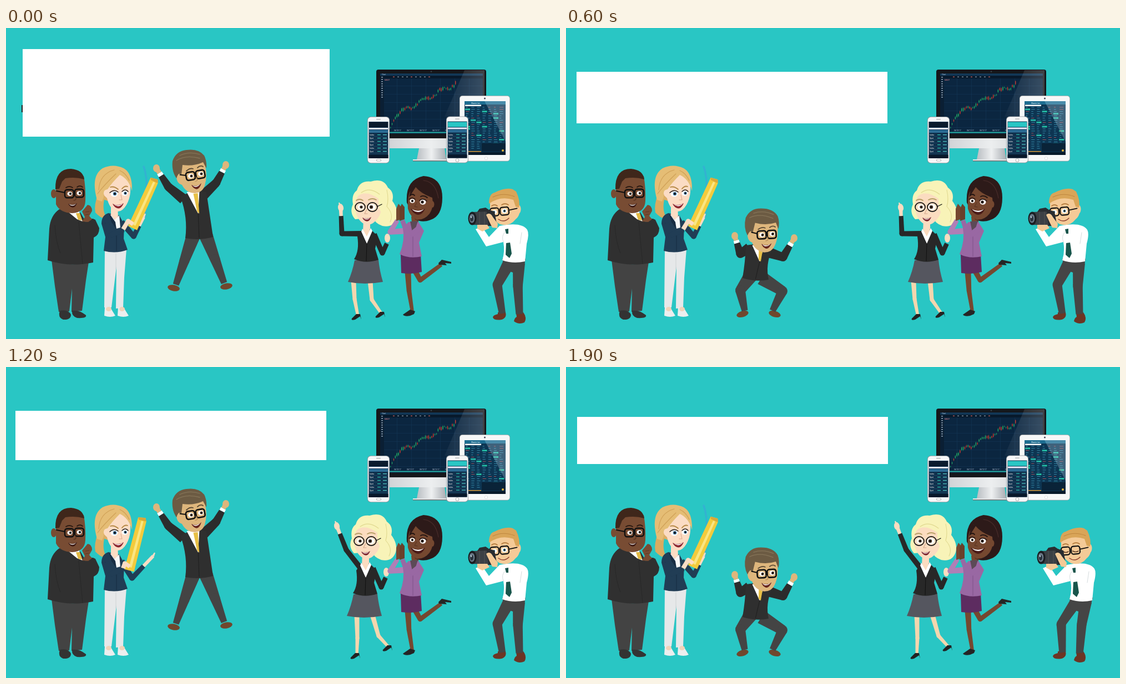
Write an HTML page that moves like this. It is 998 px wide and 561 px high and loops after 2 s.

```html
<!DOCTYPE html>
<html lang="en">
<head>
<meta charset="utf-8">
<title>Office party</title>
<style>
html, body { margin: 0; width: 100%; height: 100%; overflow: hidden; background: #29c6c4; }
svg { display: block; width: 100vw; height: 100vh; }
text { font-family: Roboto, Arial, sans-serif; }
</style>
</head>
<body>
<svg id="stage" viewBox="0 0 998 561"></svg>
<script>
const BG = '#29c6c4';

// basic shapes
const path = (fill, d, more = '') => `<path fill="${fill}" d="${d}" ${more}/>`;
const line = (color, w, d) => path('none', d, `stroke="${color}" stroke-width="${w}" stroke-linecap="round" stroke-linejoin="round"`);
const oval = (fill, x, y, rx, ry = rx, a = 0) =>
  `<ellipse fill="${fill}" cx="${x}" cy="${y}" rx="${rx}" ry="${ry}" transform="rotate(${a} ${x} ${y})"/>`;
const box = (fill, x, y, w, h, r = 0) => `<rect fill="${fill}" x="${x}" y="${y}" width="${w}" height="${h}" rx="${r}"/>`;
const label = (fill, x, y, size, s) => `<text fill="${fill}" x="${x}" y="${y}" font-size="${size}">${s}</text>`;
const group = (transform, body) => `<g transform="${transform}">${body}</g>`;
const repeat = (n, f) => Array.from({ length: n }, (_, i) => f(i)).join('');
const mix = (a, b, t) => a + (b - a) * t;
const between = (p, q, t) => [mix(p[0], q[0], t), mix(p[1], q[1], t)];

// face parts
const eye = (x, y, r, iris, dx = 0) => oval('#fff', x, y, r, r * .85) + oval(iris, x + dx, y, r * .5) + oval('#111', x + dx, y, r * .3);
const brow = (color, x, y, w, tilt = 0) => line(color, 1.8, `M${x - w},${y - tilt}Q${x},${y - 4} ${x + w},${y + tilt}`);
const smile = (color, x, y, w, tilt = 0) =>
  path(color, `M${x - w},${y}Q${x},${y + w * .5} ${x + w},${y - tilt}Q${x + w * .6},${y + w * .9} ${x},${y + w * .85}Q${x - w * .7},${y + w * .7} ${x - w},${y}Z`)
  + path('#fff', `M${x - w * .85},${y + .8}Q${x},${y + w * .5} ${x + w * .85},${y - tilt + 1}Q${x},${y + w * .85} ${x - w * .85},${y + .8}Z`);
function glasses(x1, y1, x2, y2, r, w, round, ear) {
  const rim = (x, y) => `<rect x="${x - r}" y="${y - r * .9}" width="${r * 2}" height="${r * 1.8}" rx="${round}" fill="none" stroke="#111" stroke-width="${w}"/>`;
  return rim(x1, y1) + rim(x2, y2) + line('#111', w * .8, ear);
}

// tapered limb through points
function limb(fill, w0, w1, ...pts) {
  const n = pts.length - 1;
  return repeat(n, i => {
    const [x, y] = pts[i], [u, v] = pts[i + 1];
    const a = mix(w0, w1, i / n) / 2, b = mix(w0, w1, (i + 1) / n) / 2;
    const d = Math.hypot(u - x, v - y) || 1, nx = (y - v) / d, ny = (u - x) / d;
    return path(fill, `M${x + nx * a},${y + ny * a}L${u + nx * b},${v + ny * b}L${u - nx * b},${v - ny * b}L${x - nx * a},${y - ny * a}Z`)
      + (i < n - 1 ? oval(fill, u, v, b) : '');
  });
}
// middle joint of a limb, pushed sideways or down
const joint = (p, q, dx, dy) => [(p[0] + q[0]) / 2 + dx, (p[1] + q[1]) / 2 + dy];

let seed = 7;
const rnd = () => (seed = seed * 16807 % 2147483647) / 2147483647;

function candles() {
  return repeat(42, i => {
    const t = i / 41, x = 692 + 117 * t, h = 1 + rnd() * 5;
    const y = 178 - 16 * Math.min(1, t * 16) - 62 * t + 4 * Math.sin(t * 22) + rnd() * 4 - 2;
    const c = rnd() < .65 ? '#25a866' : '#c23c30';
    return box(c, x + .5, y - h / 2 - 1.5, .5, h + 3) + box(c, x, y - h / 2, 1.5, h);
  });
}

function monitor() {
  return box('#15171b', 667, 75, 198, 128, 4) + box('url(#metal)', 667, 198, 198, 19, 3) + box('#15171b', 667, 195, 198, 4)
    + path('url(#stand)', 'M744,217H790L793,237H740Z') + box('#e4e6e8', 733, 237, 64, 2) + box('#777', 733, 239, 64, 1.5)
    + box('#0b2640', 674, 82, 185, 109) + box('#123756', 674, 82, 185, 4) + box('#081a2c', 674, 86, 185, 5) + box('#0a1f34', 674, 91, 7, 98)
    + oval('#3a4148', 766, 78.5, 1.3) + label('#bcd', 677, 85.3, 3, 'Chart') + label('#e88', 682, 94.5, 3.5, 'DAILY')
    + repeat(10, i => box('#9ab', 676, 88 + i * 4, 3, 1.4)) + repeat(9, i => box(i % 4 ? '#789' : '#a55', 697 + i * 8, 87.5, 3, 1.5))
    + repeat(6, i => box('#15395a', 704 + i * 26, 91, .5, 97) + box('#15395a', 681, 104 + i * 15, 178, .5))
    + candles() + repeat(5, i => label('#bcd', 699 + i * 23, 186, 3, '04/1' + i + '/17'))
    + box('#16616e', 674, 187, 185, 3) + line('#2fd3ba', .8, 'M676,188.5H794')
    + path('url(#glare)', 'M826,76H862V160H790Z');
}

function phone(x, y, head, button) {
  return box('#8d9499', x, y, 40, 84, 6) + box('#f6f7f8', x + .8, y + .8, 38.4, 82.4, 5.5) + box('#aaa', x + 16, y + 4, 8, 1.2, .6)
    + box('#10304c', x + 2.5, y + 9, 35, 66) + box(head, x + 3, y + 10, 34, 9) + box('#eef', x + 3, y + 20, 34, 3)
    + box('#2b6b94', x + 3, y + 24, 34, 5) + box('#08182a', x + 2.5, y + 69, 35, 6)
    + repeat(6, i => {
      const v = y + 34 + i * 6;
      return label('#fff', x + 4, v, 3.4, i % 2 ? 'Spot' : 'Index') + box('#2cc7b4', x + 18, v - 2, 6, 1.2) + box('#5cc', x + 28, v - 2, 7, 1.2)
        + box('#2a5879', x + 3, v + 1.5, 34, .5);
    }) + button;
}

function tablet() {
  const cell = (x, y) => (rnd() > .92 ? box('#20c9a4', x - 1, y - 2, 9, 2.8) : '')
    + box(rnd() > .86 ? '#a9525c' : '#3b90ae', x, y - 1, 3 + rnd() * 4, .9);
  return box('#9aa0a4', 817, 122, 91, 118.5, 5) + box('#f7f8f8', 817.7, 122.7, 89.6, 117, 4.5) + box('#0d3552', 826, 132, 74, 97)
    + oval('#445', 862.5, 127, 1.5) + oval('#ddd', 865, 235, 3) + oval('#fff', 865, 235, 2.2)
    + box('#1d6d91', 826, 132, 74, 6) + label('#fff', 838, 136.5, 3.6, 'Watch list') + box('#fff', 827, 138.5, 29, 2.5)
    + repeat(20, r => repeat(7, c => cell(828 + c * 10.2, 143.5 + r * 3.9)))
    + box('#0a2338', 857, 208, 43, 15) + box('#d79532', 832, 222, 24, 1.5) + box('#081a2a', 826, 224, 74, 5) + oval('#e3b13c', 895, 221, 2)
    + path('#cfe6f2', 'M862,132H900V205Z', 'opacity=".25"');
}

function bigMan() {
  const skin = '#784c33';
  return path('#434343', 'M82,418Q115,432 149,422L144,455L137,510L118,512L119,470L114,511L95,512L88,465Z')
    + path('#333', 'M97,510Q112,507 117,517Q117,527 103,526Q93,523 97,510Z') + path('#333', 'M119,510Q132,508 144,518Q146,524 128,523Q118,520 119,510Z')
    + path('#303030', 'M96,327Q80,338 78,362L75,419Q115,432 157,423L158,378Q168,374 168,361L161,346Q151,340 144,350L134,333L118,329Z')
    + line('#282828', 1, 'M88,356Q90,388 98,406M131,350L138,425')
    + path('#fff', 'M111,331L131,329L138,349L128,345Z') + path('#e0b843', 'M126,334L133,334L137,347L130,346Z')
    + path(skin, 'M137,331L147,319Q155,320 155,330L150,339L155,345L148,350L137,349L142,341Z') + line('#55341f', .8, 'M143,332L150,331M143,337L149,336')
    + oval(skin, 86, 299, 5, 8)
    + path(skin, 'M90,284L103,266L140,267Q144,290 143,312Q142,333 119,334Q97,333 90,318Z')
    + path('#3f271b', 'M89,291Q88,254 117,254Q139,256 141,273Q125,268 107,271L101,277L96,290Z')
    + eye(115, 299, 4.5, '#333', 1) + eye(132, 298, 4.5, '#333', 1)
    + glasses(114, 299, 132, 298, 8, 2.5, 4, 'M106,297L91,294') + brow('#2c1a12', 114, 288, 6) + brow('#2c1a12', 133, 287, 5)
    + line('#54321f', 1.2, 'M124,303Q129,310 122,311') + smile('#3c1a14', 120, 317, 8, 1);
}

// a: 0 folder leans right, 1 upright with the hand open
function blonde([a, alpha]) {
  const skin = '#fbdcc4', navy = '#213d55';
  const top = [mix(268, 246, a), 273], base = [mix(228, 222, a), mix(361, 367, a)];
  const elbow = [mix(230, 227, a), mix(376, 381, a)], hand = [mix(248, 265, a), 341], wrist = between(elbow, hand, .55);
  const len = Math.hypot(top[0] - base[0], base[1] - top[1]), turn = Math.atan2(top[0] - base[0], base[1] - top[1]) * 180 / Math.PI;
  const stick = `M${248 + 45 * a},${250 + 16 * a}Q${258 + 24 * a},${275 + 22 * a} ${250 + 10 * a},${342 + 4 * a}`;
  const [bx, by] = base;
  return `<g opacity="${alpha}">${line('#3f9fe0', 3.4, stick)}</g>`
    + path('#e6e8e9', 'M178,401L217,399L213,450L211,505L198,506L199,430L190,504L177,504Z') + line('#cfd2d4', 1, 'M198,407L198,435')
    + [178, 202].map(x => path('#eceeee', `M${x},504H${x + 10}L${x + 14},511L${x + 19},519Q${x + 10},523 ${x - 1},519Z`) + oval('#f2d3b8', x + 7, 507, 5, 4)).join('')
    + path('#d9ab60', 'M166,298Q158,320 161,333Q172,345 181,343Q172,327 178,306Z') + oval('#dcae65', 187, 282, 26, 30)
    + limb(navy, 11, 8, [208, 350], elbow, wrist) + limb(skin, 6, 6, wrist, hand) + limb(skin, 4, 2, hand, [hand[0] + 3, hand[1] - 6])
    + path(navy, 'M184,334Q172,338 172,353L179,377L176,402Q198,408 219,400L212,380L213,354L204,338Z')
    + path(skin, 'M189,322H201L202,340L197,347L189,338Z') + path('#f7f7f7', 'M187,335L196,346L204,338L206,360L199,362Z')
    + path('#172c42', 'M185,333L197,350L199,363L190,350Z') + line('#172c42', 1, 'M179,352Q181,366 188,373M199,365V402')
    + group(`translate(${bx} ${by}) rotate(${turn})`, path('#f3cb3c', `M-9,0L-8,${-len}L5,${-len - 2}L8,${4 - len}L9,0Z`)
      + path('#f9e583', `M-2,-6L-1,${5 - len}L3,${5 - len}L3,-6Z`) + path('#d9a83a', `M-8,${-len}L5,${-len - 2}L8,${4 - len}L-6,${4 - len}Z`))
    + limb(navy, 11, 8, [180, 352], [188, 374], [212, 364]) + limb(skin, 8, 7, [211, 363], [bx - 8, by - 13], [bx + 1, by - 7])
    + path(skin, 'M180,276Q198,256 221,270Q229,298 217,319Q209,333 198,331Q186,325 182,307Q175,302 175,290Z')
    + path('#e5bd75', 'M164,310Q152,267 174,253Q193,244 212,253Q228,262 227,294Q221,272 205,265Q190,280 183,291Q176,291 176,305L173,313Z')
    + line('#cf9f55', 1.1, 'M167,292Q169,263 195,256M165,299Q176,284 198,263M205,257Q216,262 222,275')
    + oval(skin, 180, 298, 4, 6) + eye(195, 299, 6.5, '#4b82ad', 1) + eye(214, 298, 5.5, '#4b82ad', 1)
    + line('#2b211d', 1.5, 'M187,297Q195,290 202,296M209,295Q215,289 220,295') + brow('#b58743', 195, 289, 7, 2) + brow('#b58743', 214, 288, 5, -2)
    + line('#d9a98c', 1.1, 'M207,301L209,310L204,310') + smile('#8c2730', 202, 317, 10, 1);
}

// c: 0 in the air, 1 deep crouch
function jumper([c]) {
  const skin = '#deb67c', drop = Math.min(1, c * 1.45), land = Math.min(1, c * 3), close = Math.min(1, c * 10);
  const sL = [314 + 10 * c, 304 + 88 * c], sR = [361 + 10 * c, 296 + 104 * c], hL = [323 - 5 * c, 379 + 72 * c], hR = [373 - 8 * c, 377 + 77 * c];
  const handL = [271 + 33 * drop, 253 + 122 * drop], handR = [396 + 15 * drop, 247 + 132 * drop];
  const footL = [306 + 16 * close, 463 + 47 * land], footR = [393 - 21 * close, 460 + 50 * land];
  const hipL = [hL[0] + 14, hL[1] - 3], hipR = [hR[0] - 13, hR[1] - 3];
  const neck = between(sL, sR, .5), fly = between(hL, hR, .5), [mx, my] = neck, [vx, vy] = between(neck, fly, .45);
  const arm = (s, h, dx) => {
    const elbow = joint(s, h, 0, 8 + 16 * drop), wrist = between(elbow, h, .6), cuff = between(elbow, h, .75);
    return limb('#2c2c2c', 19, 11, [s[0] + dx, s[1] + 5], elbow, wrist) + limb('#fff', 10, 10, wrist, cuff)
      + limb(skin, 8, 9, cuff, h) + oval(skin, h[0], h[1], 6, 7);
  };
  const leg = (hip, foot, out) => oval('#70472d', foot[0] + Math.sign(out) * 4, foot[1] + 6, 11, 5.5, Math.sign(out) * (26 * land - 10))
    + limb('#444', 25, 11, hip, joint(hip, foot, out * c, -6 * c), foot);
  const head = path(skin, 'M308,246L357,240Q364,266 358,284Q354,297 340,298Q324,297 317,283Q307,280 307,268Z')
    + path('#6c5b43', 'M307,271Q298,258 300,240Q306,222 325,220Q347,217 357,230Q362,240 361,253L355,242Q338,250 318,247L316,264L311,263Z')
    + line('#857458', 1.3, 'M307,239Q324,228 349,235M313,230Q330,222 349,228')
    + oval(skin, 312, 271, 4, 7) + eye(333, 267, 5, '#4a3320', 1) + eye(351, 263, 5, '#4a3320', 1)
    + group('rotate(-10 341 264)', glasses(332, 265.5, 350, 265.5, 8, 2.6, 4, 'M324,263L314,260'))
    + brow('#5a4933', 331, 256, 6, -2) + brow('#5a4933', 350, 251, 5, -1)
    + line('#b98d58', 1.2, 'M342,269Q348,275 341,277') + smile('#66251d', 343, 283, 9, 3);
  return leg(hipR, footR, 28) + leg(hipL, footL, -13) + arm(sL, handL, 6) + arm(sR, handR, -5)
    + path('#2f2f2f', `M${sL}L${mx},${my - 7}L${sR}Q${hR[0] - 6},${(sR[1] + hR[1]) / 2} ${hR}Q${fly[0]},${fly[1] + 6} ${hL}Q${hL[0] + 5},${(sL[1] + hL[1]) / 2} ${sL}Z`)
    + path('#fff', `M${mx - 12},${my - 4}L${mx + 11},${my - 7}L${vx + 4},${vy}Z`) + path('#e7bf45', `M${mx},${my - 1}L${mx + 8},${my - 2}L${vx + 6},${vy}L${vx + 2},${vy - 4}Z`)
    + line('#1e1e1e', 1, `M${vx + 4},${vy}L${fly}`)
    + group(`translate(${21 * drop} ${106 * c}) rotate(${7 * drop} 331 260)`, head);
}

// r: 0 arm bent, 1 arm raised
function cheerer([r]) {
  const skin = '#fbdcc0', legs = '#f3d6ae', cream = '#f8f3b8', dx = -2 * r, dy = -9 * r, step = r ** 3;
  const elbow = [605 + 8 * r, 371 - 41 * r], hand = [603 - 7 * r, 324 - 37 * r], wrist = between(elbow, hand, .68);
  const leg = (x, knee, [fx, fy]) => limb(legs, 9, 5, [x, 456 + dy], knee, [fx, fy])
    + path('#222', `M${fx - 3},${fy - 4}L${fx + 4},${fy - 4}L${fx + 6},${fy + 6}L${fx + 4},${fy}L${fx - 5},${fy + 6}Q${fx - 13},${fy + 8} ${fx - 11},${fy + 4}Z`);
  const body = path('#55565f', 'M628,419L671,418Q673,438 679,458Q646,464 616,458Q624,440 628,419Z')
    + limb('#282828', 10, 8, [663, 372], [678, 406], [686, 389]) + oval(skin, 687, 379, 5, 8)
    + path(skin, 'M644,345H656V372L650,379L643,367Z') + path('#282828', 'M642,363L633,376Q637,402 627,417Q648,426 671,418L665,398L670,376L656,362L651,382Z')
    + path('#fff', 'M642,362L650,376L657,361L660,366L650,389L640,367Z') + line('#111', 1, 'M650,389L649,420')
    + path(cream, 'M629,345Q618,333 625,318Q622,300 632,293Q637,275 657,277Q680,270 688,288Q700,296 696,312Q708,328 704,343Q698,361 678,357Q664,352 662,342Z')
    + path(skin, 'M632,302Q650,288 675,304Q681,326 670,343Q660,357 648,355Q634,349 630,331Q627,314 632,302Z')
    + path(cream, 'M626,318Q628,295 648,285Q675,283 682,304Q679,326 684,345Q670,331 671,308Q650,292 635,302Z')
    + line('#e0d88f', 1.1, 'M640,297Q655,286 673,300M686,292Q690,310 686,322Q699,336 692,350')
    + eye(639, 323, 5.5, '#5b4030', 1) + eye(659, 323, 6.5, '#5b4030', -1)
    + glasses(638, 323, 660, 323, 9, 1.7, 9, 'M669,322L677,318') + brow('#b79f63', 637, 311, 6) + brow('#b79f63', 660, 310, 7)
    + line('#d4a68a', 1.1, 'M650,327L646,335L651,335') + smile('#7d242d', 650, 342, 8, 1);
  return leg(626 + 6 * r, [628 + 5 * r, 489], [634 - 2 * r, 520]) + leg(656 + 4 * r, [659 + 12 * r, 490 - 5 * r], [677 + 13 * step, 516 - 10 * step])
    + limb('#282828', 10, 8, [640 + dx, 371 + dy], elbow, wrist) + limb(skin, 6, 7, wrist, hand)
    + oval(skin, hand[0], hand[1], 5, 7, -12) + limb(skin, 4, 2, hand, [hand[0] - 3, hand[1] - 9])
    + group(`translate(${dx} ${dy})`, body);
}

function clapper(k) {
  const skin = '#754830', hand = (fill, x) => path(fill, `M${x - 4},348L${x - 4},326L${x},317L${x + 5},323L${x + 5},345Z`);
  return limb(skin, 10, 7, [738, 440], [746, 455], [784, 427]) + limb(skin, 11, 6, [724, 440], [726, 474], [732, 512])
    + path('#252525', 'M728,508L737,511L735,516L728,519Q718,521 715,517Z') + path('#252525', 'M779,424L785,418L802,422L802,425L791,424L794,428L780,427Z')
    + path('#5d2c60', 'M711,408H747L749,440Q732,445 712,442Z') + path(skin, 'M730,340H742L744,360L732,362Z')
    + limb('#b07fb6', 11, 8, [719, 366], [692, 368], [705 - k, 347])
    + path('#9968a3', 'M725,350L715,360Q719,384 709,408Q727,417 749,412L744,387L753,366L743,350Z') + path('#5c4a57', 'M728,349L742,348L737,364L733,373Z')
    + line('#7f5289', 1, 'M733,373L733,412') + limb('#9968a3', 11, 8, [745, 361], [725, 376], [714 + k, 347])
    + path('#2d1a19', 'M722,315Q719,274 752,267Q786,269 786,306Q786,339 765,346Q750,352 737,345Z')
    + path(skin, 'M735,284Q748,294 766,299Q773,320 763,335Q753,347 740,346Q728,341 724,326Q723,309 727,297Z')
    + path('#2d1a19', 'M729,292Q741,272 757,280Q772,289 768,306Q748,299 738,287L726,306Z') + line('#4a2d2b', 1.1, 'M752,275Q774,277 779,307')
    + oval(skin, 768, 318, 3.5, 6) + eye(732, 312, 4.5, '#3b241a') + eye(751, 314, 5.5, '#3b241a', -1)
    + line('#211311', 1.5, 'M726,309Q731,304 737,309M745,311Q751,306 758,312') + brow('#211311', 732, 302, 4) + brow('#211311', 753, 305, 6, 1)
    + line('#57311f', 1, 'M740,315L736,322L741,323') + smile('#4a1c19', 742, 326, 13, 0)
    + hand(skin, 707 - k) + hand('#69402a', 713 + k);
}

// k: 0 aiming, 1 leaning right with the eyes shut
function photographer([k]) {
  const skin = '#f4ca97', m = .13 * k;
  const legs = limb('#454545', 22, 12, [906, 424], [885, 463], [894, 515]) + limb('#454545', 22, 13, [924, 424], [922, 465], [925, 516]) + path('#454545', 'M894,416H936L933,432L913,441L898,436Z');
  const feet = path('#6c3524', 'M886,513L899,511Q904,522 893,526Q879,528 877,522Q877,518 886,516Z') + path('#6c3524', 'M919,515L932,513Q939,523 934,531Q924,536 915,529Q916,523 920,521Z');
  const body = path('#fff', 'M889,357Q929,349 939,364Q943,371 938,389L935,421Q914,426 894,419Q899,404 896,386L865,394L846,363L857,358L870,377Z')
    + line('#d5dcde', 1, 'M896,386Q892,376 898,369M929,369L926,389') + path('#18554b', 'M899,363L905,362L905,371L901,371Z') + path('#18554b', 'M901,388L908,387L911,407L907,415L900,409Z');
  const eyes = k > .7 ? line('#5b3a25', 1.6, 'M876,333Q880,336 885,333M893,332Q898,335 903,332') : eye(880, 332, 4.5, '#5b8ea4', -1) + eye(898, 330, 5, '#5b8ea4');
  const head = path(skin, 'M872,311Q892,294 920,309L925,321Q928,337 918,345Q907,359 890,354Q874,346 872,328Z') + oval(skin, 923, 327, 4.5, 8)
    + path('#d9a558', 'M870,317Q870,299 880,297Q900,287 913,291L919,295Q927,312 924,324L918,322L914,310Q891,302 870,317Z') + line('#bf873f', 1.1, 'M877,305Q895,296 916,304') + eyes
    + group('rotate(-5 890 331)', glasses(880, 331, 898, 331, 7.8, 2.2, 4, 'M906,330L921,328'))
    + brow('#b77f42', 880, 321, 5) + brow('#b77f42', 899, 319, 6) + line('#8b4030', 1.5, 'M887,345Q897,352 906,343');
  const camera = path('#292d31', 'M848,333L853,326L864,324L870,328L880,331L884,353L878,357L850,357Z') + path('#3b4045', 'M839,332L866,331L869,356L840,355Z') + line('#555', 1, 'M853,332V356M862,332V356')
    + oval('#1b1e22', 840, 343.5, 7.5, 12) + oval('#697988', 839.5, 343.5, 4.8, 8) + oval('#28323c', 839, 344, 3, 5) + oval('#b6c5cd', 838, 341, 1.3, 2)
    + path(skin, 'M865,337Q872,331 877,341L886,353L885,361L876,360L871,350Z') + path(skin, 'M849,355L867,355L871,361L858,367L849,362Z');
  return feet + group(`matrix(1 0 ${-m} 1 ${m * 518} 0)`, legs) + group(`translate(${13 * k} 0)`, body)
    + group(`translate(${20 * k} 0)`, head) + group(`translate(${16 * k} 0)`, camera);
}

// key points [step, value...], twenty steps per loop
const jump = [[0, 0], [4, .1], [6, 1], [10, 1], [12, 0], [16, .68], [19, 1], [20, 0]];
const wave = [[0, 0, .5], [4, .6, 1], [6, 0, .5], [10, 0, .5], [12, 1, 0], [16, 1, 1], [19, 0, .5], [20, 0, .5]];
const cheer = [[0, 0], [4, .8], [6, 0], [10, 0], [12, 1], [16, 0], [19, 1], [20, 0]];
const lean = [[0, 0], [16, 0], [18, 1], [19, 1], [20, 0]];
// left, top, height of the white panel, held until the next key
const panel = [[0, 30, 38, 158], [1, 22, 86, 81], [6, 19, 79, 93], [10, 24, 82, 96], [12, 17, 79, 89], [16, 14, 75, 90], [19, 20, 90, 85]];

function at(keys, step) {
  const i = keys.findIndex(k => k[0] > step), [a, ...p] = keys[i - 1], [b, ...q] = keys[i];
  return p.map((v, n) => mix(v, q[n], (step - a) / (b - a)));
}

const grad = (id, stops) => `<linearGradient id="${id}">` + stops.map((c, i) => `<stop offset="${i / (stops.length - 1)}" stop-color="${c}"/>`).join('') + '</linearGradient>';
const stage = document.getElementById('stage');
stage.innerHTML = '<defs>' + grad('metal', ['#c9ccd0', '#eceeef', '#bfc3c7']) + grad('stand', ['#b9bdc2', '#eef0f1', '#a9adb2']) + grad('glare', ['#ffffff08', '#ffffff30']) + '</defs>'
  + box(BG, 0, 0, 998, 561) + monitor() + tablet()
  + phone(651, 160, '#0a1b2d', box('#aaa', 667, 236.5, 9, 4, 2) + box('#fff', 668, 237.2, 7, 2.6, 1.3))
  + phone(793, 159.5, BG, oval('#aaa', 813, 238.5, 3.2) + oval('#fff', 813, 238.5, 2.4))
  + bigMan() + '<g id="live"></g>';
const live = document.getElementById('live');

function draw(step) {
  const [, x, y, h] = panel.filter(k => k[0] <= step).pop();
  live.innerHTML = (step ? '' : box('#222', 28, 139, 3, 13)) + box('#fff', x, y, step ? 560 : 553, h)
    + jumper(at(jump, step)) + blonde(at(wave, step)) + cheerer(at(cheer, step))
    + clapper(step % 4 == 2 ? 1 : 0) + photographer(at(lean, step));
}

let last = -1;
function tick() {
  const step = Math.floor(performance.now() % 2000 / 100);
  if (step != last) draw(last = step);
  requestAnimationFrame(tick);
}
tick();
</script>
</body>
</html>
```
